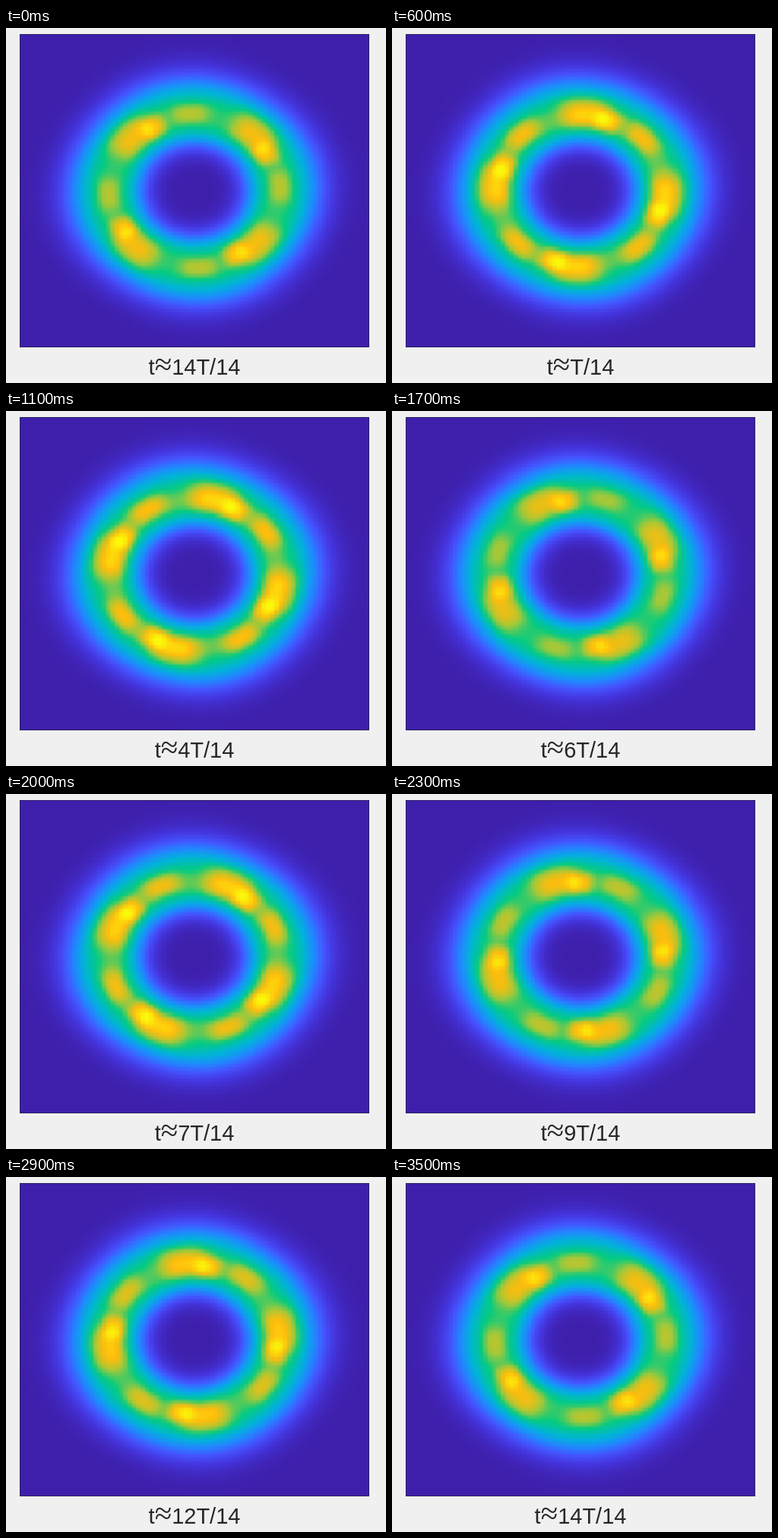
An HTML page with a canvas for the animation above (3.6 s loop, 500 px wide and 468 px high).

```html
<!DOCTYPE html>
<html lang="en">
<head>
<meta charset="utf-8">
<title>Rotating ring density</title>
<style>
html, body { margin: 0; width: 100%; height: 100%; overflow: hidden; background: #f0f0f0; }
canvas { display: block; }
</style>
</head>
<body>
<canvas id="stage" width="500" height="468"></canvas>
<script>
const ctx = document.getElementById('stage').getContext('2d');
const LOOP = 3600, STATES = 9, GRID = 81;
const BOX = { x: 18, y: 8, w: 460, h: 413 };
const RAD = Math.PI / 180;

// Evenly spaced colour map, low to high
const MAP = ['3e1fab', '4434dd', '4455ff', '2088ff', '00b4d8', '04cb80', 'a0c83a', 'ffbc0c', 'faf90a']
  .map(hex => [0, 2, 4].map(i => parseInt(hex.slice(i, i + 2), 16)));

function colour(v) {
  const p = Math.min(v, 0.9999) * (MAP.length - 1);
  const i = Math.floor(p);
  return MAP[i].map((c, k) => c + (MAP[i + 1][k] - c) * (p - i));
}

// Flat-topped bump of half-width w
const bump = (d, w) => Math.exp(-(Math.abs(d / w) ** 3));

// Signed angle to the nearest of four equal lobes
const fold = a => a - 90 * Math.round(a / 90);

const cos4 = a => Math.cos(4 * a * RAD);

function density(u, v, phi) {
  const r = Math.hypot(u, v);
  const a = Math.atan2(v, u) / RAD;
  const d = r - 0.235;
  const width = d > 0 ? 0.135 + 0.004 * cos4(a - 10) : 0.1;
  const ring = 0.64 * Math.exp(-(Math.abs(d / width) ** 2.6));
  const lobe = (at, wa, r0, wr) => bump(fold(a - phi - at), wa) * bump(r - r0, wr);
  // The lobes strengthen and weaken as they pass the fixed square lattice
  const c = cos4(phi - 16);
  return ring
    + 0.03 * (1 - c) * bump(d, 0.03)
    + (0.22 - 0.015 * c) * lobe(17, 16, 0.25, 0.05)
    + 0.2 * lobe(0, 9, 0.234, 0.034)
    + (0.15 - 0.035 * c) * lobe(-27, 13, 0.248, 0.032);
}

function field(s) {
  const c = document.createElement('canvas');
  c.width = c.height = GRID;
  const g = c.getContext('2d');
  const img = g.createImageData(GRID, GRID);
  const phi = 30 + s * 360 / STATES;
  for (let j = 0, p = 0; j < GRID; j++) {
    for (let i = 0; i < GRID; i++, p += 4) {
      const v = density((i + 0.5) / GRID - 0.5, 0.5 - (j + 0.5) / GRID, phi);
      img.data.set([...colour(v), 255], p);
    }
  }
  g.putImageData(img, 0, 0);
  return c;
}

const fields = Array.from({ length: STATES }, (_, s) => field(s));

function label(step) {
  const n = step === 0 ? 14 : Math.floor(step * 14 / STATES);
  const sans = '29px "Liberation Sans", Arial, sans-serif';
  const parts = [
    ['t', sans],
    ['≈', '41px "Liberation Serif", serif'],
    [(n === 1 ? '' : n) + 'T/14', sans]
  ];
  const widths = parts.map(([text, font]) => {
    ctx.font = font;
    return ctx.measureText(text).width;
  });
  let x = 248 - widths.reduce((a, b) => a + b) / 2;
  ctx.fillStyle = '#262626';
  parts.forEach(([text, font], i) => {
    ctx.font = font;
    ctx.fillText(text, x, 457);
    x += widths[i];
  });
}

function draw(step) {
  const { x, y, w, h } = BOX;
  ctx.fillStyle = '#f0f0f0';
  ctx.fillRect(0, 0, 500, 468);
  ctx.save();
  ctx.beginPath();
  ctx.rect(x, y, w, h);
  ctx.clip();
  ctx.fillStyle = '#3e1fab';
  ctx.fillRect(x, y, w, h);
  ctx.imageSmoothingEnabled = false;
  ctx.filter = 'blur(1px)';
  ctx.drawImage(fields[step % STATES], x, y, w, h);
  ctx.restore();
  ctx.strokeStyle = '#2b2460';
  ctx.strokeRect(x + 0.5, y + 0.5, w - 1, h - 1);
  label(step);
}

let shown = -1;
const start = performance.now();
function tick() {
  const t = (performance.now() - start) % LOOP;
  // Ten poses spread over 36 ticks; the last equals the first
  const step = Math.floor(Math.floor(t / 100) / 3.6);
  if (step !== shown) draw(shown = step);
  requestAnimationFrame(tick);
}
tick();
</script>
</body>
</html>
```
